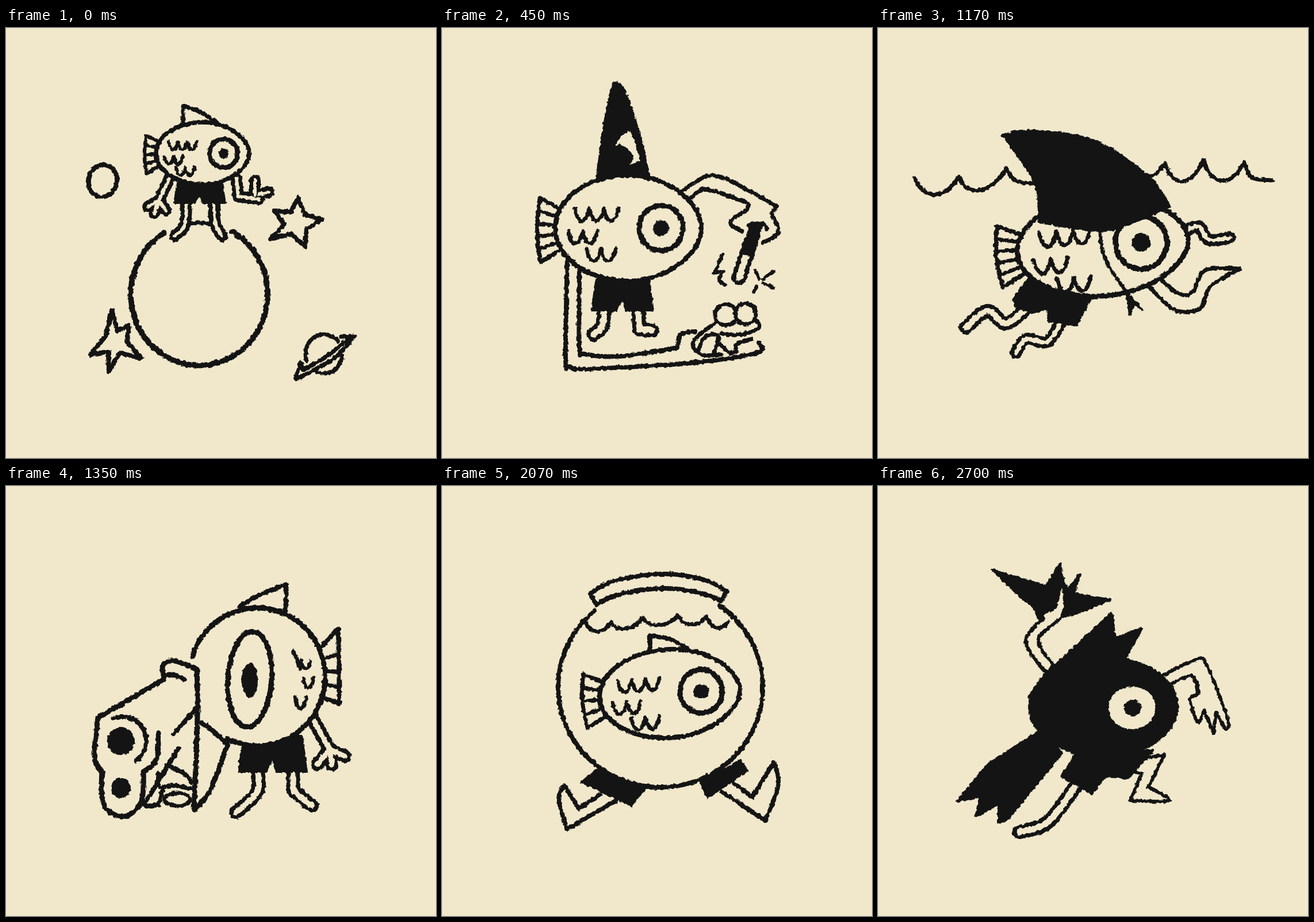
Write an HTML page that moves like this. It is 748 by 748 pixels and loops after 3.15 s.

```html
<!DOCTYPE html>
<html lang="en">
<head>
<meta charset="utf-8">
<title>Fish adventures</title>
<style>
  html, body { margin: 0; width: 100%; height: 100%; overflow: hidden; background: #f1e8cc; }
  svg { display: block; width: 100%; height: 100%; }
  g { fill: none; stroke: #141414; stroke-linecap: round; stroke-linejoin: round; }
  .paper { fill: #f1e8cc; }
  .ink { fill: #141414; }
  .bare { stroke: none; }
  .core { stroke: #f1e8cc; }
</style>
</head>
<body>
<svg id="stage" viewBox="0 0 748 748">
  <filter id="rough" filterUnits="userSpaceOnUse" x="0" y="0" width="748" height="748" color-interpolation-filters="sRGB">
    <feTurbulence type="fractalNoise" baseFrequency=".16" numOctaves="2" seed="4"/>
    <feDisplacementMap in="SourceGraphic" scale="6" xChannelSelector="R" yChannelSelector="G"/>
  </filter>
</svg>
<script>
const HOLD = 450;

// Points are written "x,y"; a trailing "!" makes a sharp corner.
const parse = text => text.trim().split(/\s+/).map(word => {
  const [x, y] = word.split(',').map(parseFloat);
  return { x, y, sharp: word.endsWith('!') };
});
const mix = (a, b, t) => ({ x: a.x + (b.x - a.x) * t, y: a.y + (b.y - a.y) * t });
const join = pts => pts.map(p => `${p.x},${p.y}`).join(' ');

function curve(text, closed) {
  const pts = parse(text), n = pts.length;
  const at = i => closed ? pts[(i + n) % n] : pts[Math.max(0, Math.min(n - 1, i))];
  const handle = (p, from, to) => {
    const k = p.sharp ? 0 : 1 / 6;
    return `${p.x + (to.x - from.x) * k},${p.y + (to.y - from.y) * k}`;
  };
  let d = `M${join([pts[0]])}`;
  for (let i = 0; i < (closed ? n : n - 1); i++) {
    const a = at(i), b = at(i + 1);
    d += `C${handle(a, at(i - 1), b)} ${handle(b, at(i + 2), a)} ${join([b])}`;
  }
  return closed ? d + 'Z' : d;
}

const path = (d, width, look = '') => `<path d="${d}" stroke-width="${width}" class="${look}"/>`;
const lines = (width, ...list) => list.map(p => path(curve(p), width)).join('');
const cover = (width, p) => path(curve(p, true), width, 'paper');
const cutout = p => path(curve(p, true), 0, 'paper bare');
const blob = p => path(curve(p, true), 3, 'ink');
const shard = p => path(`M${p}Z`, 4, 'ink');
const oval = (x, y, rx, ry, width, look = '', turn = 0) =>
  `<ellipse cx="${x}" cy="${y}" rx="${rx}" ry="${ry}" stroke-width="${width}" class="${look}" transform="rotate(${turn} ${x} ${y})"/>`;
const dot = (x, y, rx, ry = rx) => oval(x, y, rx, ry, 0, 'ink bare');

function arc(width, x, y, rx, ry, from, to, look, nose = 0) {
  const pts = [];
  for (let deg = from; deg <= to; deg += 3) {
    const t = deg * Math.PI / 180, c = Math.cos(t);
    pts.push({ x: x + rx * c, y: y + ry * Math.sin(t) * (1 - nose * Math.max(0, c) ** 2) });
  }
  return path('M' + join(pts), width, look);
}

// Cusps joined by round dips.
function wave(width, sag, tips) {
  const pts = parse(tips);
  const dips = pts.slice(1).map((b, i) => {
    const a = pts[i], drop = sag * 4 / 3;
    const l = mix(a, b, .2), r = mix(a, b, .7);
    return `C${l.x},${l.y + drop} ${r.x},${r.y + drop} ${join([b])}`;
  });
  return path(`M${join([pts[0]])}${dips.join('')}`, width);
}

function scales(x, y, step, width) {
  return [[0, 0, 3], [-.45, 1.55, 2], [.8, 2.75, 2]].map(([dx, dy, count]) => {
    const tips = Array.from({ length: count + 1 }, (_, i) => ({ x: x + (dx + i) * step, y: y + dy * step }));
    return wave(width, step * .85, join(tips));
  }).join('');
}

// Joined tubes: one shared outline around all paths.
function limb(gap, ...list) {
  const layer = (width, look) => list.map(p => path(curve(p), width, look)).join('');
  return layer(gap + 7) + layer(gap - 7, 'core');
}
const arm = (gap, shoulder, wrist, ...tips) => limb(gap, `${shoulder} ${wrist}`, ...tips.map(t => `${wrist} ${t}`));

function shorts(x, top, half, height) {
  const hem = top + height, waist = half * .86;
  return shard(`${x - waist},${top} ${x - half},${hem} ${x - half * .2},${hem} ${x},${hem - height * .4} ${x + half * .1},${hem} ${x + half},${hem} ${x + waist},${top}`);
}

function star(width, x, y, r, tips) {
  const pts = parse(tips), centre = { x, y };
  const ring = pts.flatMap((p, i) => {
    const m = mix(p, pts[(i + 1) % pts.length], .5);
    return [p, mix(centre, m, r / Math.hypot(m.x - x, m.y - y))];
  });
  return path(`M${join(ring)}Z`, width);
}

function sparkle(width, x, y, tips) {
  const pts = parse(tips);
  return path(`M${join([pts[0]])}` + [1, 2, 3, 0].map(i => `Q${x},${y} ${join([pts[i]])}`).join('') + 'Z', width, 'paper');
}

// A whole fish head and tail, proportioned from its body ellipse.
function fish(x, y, rx, ry, width, { turn = 0, ribs = 3, front = '' } = {}) {
  const spot = (u, v) => ({ x: x + rx * u, y: y + ry * v });
  const top = spot(-1.21, -.57), bottom = spot(-1.2, .65), rootTop = spot(-.88, -.32), rootBottom = spot(-.88, .36);
  const thin = width * .8;
  let tail = path(`M${join([rootTop, top])}Q${join([spot(-1.29, .1), bottom])}L${join([rootBottom])}`, width - 1);
  for (let i = 1; i <= ribs; i++) {
    const t = i / (ribs + 1);
    const edge = mix(top, bottom, t);
    edge.x -= rx * .16 * t * (1 - t);
    tail += path(`M${join([edge, mix(rootTop, rootBottom, t)])}`, thin);
  }
  const mark = spot(-.73, -.37), eye = spot(.45, 0);
  return `<g transform="rotate(${turn} ${x} ${y})">${tail}`
    + arc(width, x, y, rx, ry, 0, 360, 'paper', .1)
    + scales(mark.x, mark.y, rx * .2, thin)
    + oval(eye.x, eye.y, rx * .3, rx * .31, width + 1) + dot(eye.x, eye.y, rx * .108) + '</g>' + front;
}

const planet = [
  arc(9.5, 336, 463, 119, 124, -61, 240),
  arc(7, 336, 463, 119, 124, -98, -80),
  oval(168, 266, 25, 28, 8, '', 12),
  star(8, 505, 339, 21, '508,296 549,333 520,380 460,367 468,319'),
  star(8, 190, 547, 20, '184,491 214,517 235,574 179,597 147,568'),
  arc(7, 553, 567, 32, 34, 160, 320), arc(7, 553, 567, 32, 34, 5, 112),
  lines(7, '582,537! 606,536! 570,575 504,611! 513,581! 516,595! 555,573 595,541!'),
  limb(13, '314,300 311,342 294,362'), limb(13, '362,300 364,340 376,362'),
  arm(13, '284,262', '266,300', '247,311', '258,322', '278,317'),
  limb(13, '401,262 404,293! 440,298', '433,290 433,265', '440,290 457,285'),
  shorts(337, 268, 44, 36),
  lines(7, '308,168 308,136! 335,145 368,165'),
  fish(342, 218, 81, 54, 7.5)
];

const wizard = [
  lines(8,
    '218,400 215,575 223,589 250,593 430,583 548,565 551,548',
    '239,420 239,555 248,567 310,571 410,556! 415,533 440,528'),
  lines(7,
    '410,290 440,268 465,257 500,265 582,310! 573,323! 585,355 558,374',
    '420,306 445,286 463,281 533,305! 531,316! 501,338 522,354',
    '533,342 557,340 566,350'),
  limb(19, '536,375 517,434'),
  shard('537,342 556,343 542,396 521,393'),
  lines(6, '488,395! 474,426! 490,423! 482,438 492,447', '545,422 552,436', '576,424 558,437', '559,444 577,452', '547,449 543,459'),
  lines(7,
    '477,511 437,546 452,568 485,568',
    '486,531 510,534 540,528 552,518 546,508',
    '447,558 455,540 470,533 481,538 473,566',
    '484,550 500,565 512,562 512,550 538,541'),
  oval(494, 499, 19, 18, 7, 'paper'), oval(528, 497, 18, 18, 7, 'paper'),
  limb(18, '282,485 279,518 264,533'), limb(18, '341,485 344,524! 365,526'),
  shorts(314, 438, 53, 53),
  blob('303,95 296,102 284,155 268,265! 361,260! 345,190 325,125 311,99'),
  cutout('302,207! 309,190 327,179! 334,195 345,231! 327,238! 332,222 312,203'),
  fish(324, 348, 127, 92, 8, { ribs: 4 })
];

const shark = [
  wave(7, 30, '64,261 140,259 223,244'), wave(7, 34, '499,235 566,230 637,233'),
  lines(7, '223,244 240,266 270,270', '470,260 485,252 499,235', '637,233 650,260 685,265'),
  limb(14, '530,356 557,345 575,368 612,365'),
  lines(7, '488,435 525,463 548,458 570,421 629,419! 578,450 560,488 515,490 470,448'),
  limb(17, '258,488 222,514 190,492 153,521'), limb(14, '318,512 294,546 258,541 240,565'),
  shard('262,435 236,472 240,485 270,495 295,488 297,510 345,517 374,464'),
  fish(391, 379, 149, 87, 8.5, { turn: -5, ribs: 4 }),
  lines(6, '386,350 390,385 405,420 432,458'),
  shard('432,458 438,499 446,480 460,490'),
  blob('216,187! 265,178 375,195 470,257 508,311! 420,348 370,352 280,338! 272,270 230,205')
];

const shooter = [
  arm(16, '532,402', '563,458', '542,484', '567,485', '589,470'),
  limb(17, '438,495 437,532 400,568'), limb(17, '499,495 500,530! 532,556'),
  shorts(464, 436, 59, 61),
  lines(8, '407,209 440,190 488,171! 486,228', '545,284 578,248! 580,378! 550,368'),
  lines(6.5, '556,300 577,293', '559,322 577,324', '558,346 577,349'),
  arc(9, 437, 332, 118, 120, 197, 476, 'paper'),
  lines(9, '386,450 362,428 340,411'),
  oval(424, 336, 38, 83, 9, '', 4), dot(424, 338, 14, 30),
  wave(6.5, 14, '513,303 530,305'), wave(6.5, 18, '518,335 535,333'), wave(6.5, 20, '503,367 522,368'),
  lines(6.5, '499,287 505,300 511,317 514,303'),
  lines(9,
    '274,330 273,312 290,304 332,318! 333,400 327,563! 355,530 384,453',
    '275,330 290,328 310,336',
    '275,336 160,403! 154,470 167,498! 170,555 205,575 235,550 239,497! 262,475 265,430'),
  arc(8, 203, 443, 41, 42, 248, 418),
  lines(8, '291,432 332,386', '240,555 300,456', '243,557 265,555! 272,530', '265,500 265,520', '280,486 310,500 322,515', '270,525 290,521 320,526'),
  oval(298, 545, 22, 11, 7),
  dot(200, 444, 24), dot(200, 525, 17, 18)
];

const bowl = [
  lines(7.5,
    '303,547 218,597! 203,545 213,521! 238,561! 275,537',
    '487,532 562,582! 585,520 577,481! 540,541! 508,517'),
  shard('269,494 243,515 330,556 352,526'), shard('450,516 462,542 531,495 519,478'),
  arc(8, 380, 350, 178, 174, -55, 232, 'paper'),
  lines(8, '268,206! 258,187! 300,165 385,153 455,163 495,183! 485,200! 445,185 385,178 310,188 268,206'),
  wave(7, 15, '251,239 294,237 349,229 410,225 460,227 498,236'),
  lines(7, '362,288 361,260! 395,266 426,282'),
  fish(396, 361, 122, 77, 8, { turn: -4 })
];

const ring = [
  lines(9,
    '424,172 438,133! 370,160 207,267! 212,208! 150,285 130,380 165,455 240,493 310,556 375,616! 384,585 367,545',
    '226,352 202,395 233,430'),
  arc(9.5, 419, 363, 189, 186, -28, 314),
  arc(9.5, 418, 359, 158, 155, 0, 360),
  sparkle(8, 577, 234, '574,163 620,232 579,302 535,241'),
  lines(7, '263,344 320,351', '262,371 320,368', '378,308 368,280! 400,283 431,303'),
  limb(13, '364,430 361,457 343,469'), limb(13, '417,430 417,459! 440,470'),
  arm(13, '453,392', '463,424', '451,434', '466,444', '481,431'),
  shorts(396, 396, 41, 38),
  fish(411, 353, 73, 48, 7, { ribs: 0 })
];

const ninja = [
  shard('199,146 292,174 317,135 321,165 330,180 351,154 341,187 404,198 358,217 322,228 279,231 272,212 247,192'),
  cover(6, '294,325 257,270 288,231! 287,222 308,212! 321,162! 322,222 279,266 304,309!'),
  lines(6,
    '485,335 553,302 572,312 608,405 605,424! 588,393! 584,430! 567,390! 556,411 542,370! 557,360! 545,330 500,350',
    '464,473 498,468! 470,524! 507,547 439,547! 459,500! 445,497'),
  limb(18, '345,520 296,584 246,602'),
  dot(392, 384, 131, 89),
  shard('262,368 290,328 407,220 412,265 435,256 459,248 430,300'),
  shard('283,425 190,485 138,548 178,540 170,575 210,553 210,586 225,580 320,465'),
  shard('345,465 319,505 372,535 395,505 435,508 478,460'),
  oval(442, 386, 41, 37, 0, 'paper bare'), dot(443, 386, 15, 14)
];

const scenes = [planet, wizard, shark, shooter, bowl, ring, ninja];
const stage = document.getElementById('stage');
const total = HOLD * scenes.length;
const share = 1 / scenes.length;

scenes.forEach((parts, i) => {
  const group = document.createElementNS('http://www.w3.org/2000/svg', 'g');
  group.setAttribute('filter', 'url(#rough)');
  group.innerHTML = parts.join('');
  stage.append(group);
  group.animate([
    { visibility: 'visible', offset: 0 },
    { visibility: 'visible', offset: share },
    { visibility: 'hidden', offset: share },
    { visibility: 'hidden', offset: 1 }
  ], { duration: total, delay: i * HOLD - total, iterations: Infinity });
});
</script>
</body>
</html>
```
